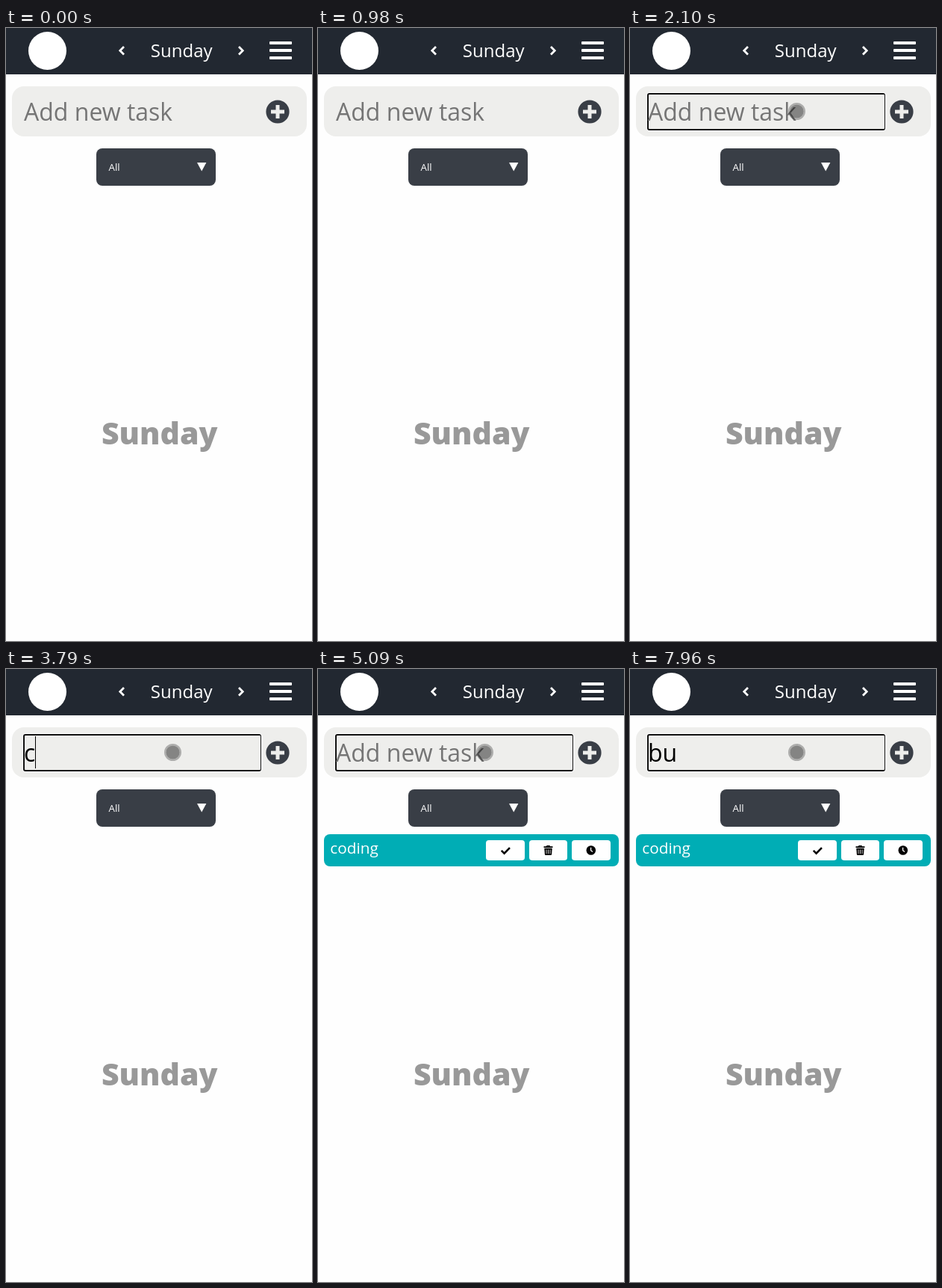
These frames come from a looping animation (410x820 px, 8 s). An HTML page:

```html
<!DOCTYPE html>
<html lang="en">
<head>
<meta charset="utf-8">
<title>Task list</title>
<style>
  html, body { margin: 0; width: 100%; height: 100%; overflow: hidden; background: #fefefe; }
  svg { display: block; width: 410px; height: 820px; }
  text { font-family: "Open Sans", "Noto Sans", sans-serif; white-space: pre; }
</style>
</head>
<body>
<svg viewBox="0 0 410 820">
  <rect width="410" height="820" fill="#fefefe"/>

  <!-- header -->
  <rect width="410" height="62" fill="#222831"/>
  <circle cx="55.5" cy="30.5" r="25.5" fill="#fff"/>
  <g fill="none" stroke="#fff" stroke-width="2.8">
    <path d="M158 25l-5.2 5.2 5.2 5.2M312 25l5.2 5.2-5.2 5.2"/>
  </g>
  <text x="235.2" y="39" font-size="24" text-anchor="middle" fill="#fff">Sunday</text>
  <g fill="#fff">
    <rect x="353" y="18" width="30" height="4" rx="1"/>
    <rect x="353" y="28" width="30" height="4" rx="1"/>
    <rect x="353" y="38" width="30" height="4" rx="1"/>
  </g>

  <!-- task entry -->
  <rect x="8" y="78" width="395" height="67" rx="16" fill="#eeeeec"/>
  <g id="ring">
    <rect x="22" y="86" width="321" height="52" rx="4" fill="#fff"/>
    <rect x="23" y="87" width="319" height="50" rx="3" fill="#101010"/>
    <rect x="25" y="89" width="316" height="46" rx="1" fill="#eeeeec"/>
  </g>
  <text id="entry" x="24" y="124" font-size="32"></text>
  <rect id="caret" y="90" width="1" height="43" fill="#000"/>
  <circle cx="364" cy="112" r="15.6" fill="#393e46"/>
  <path d="M355 112h18M364 103v18" stroke="#eeeeec" stroke-width="5"/>

  <!-- filter -->
  <rect x="121" y="161" width="160" height="50" rx="8" fill="#393e46"/>
  <text x="137.5" y="191" font-size="13.333" fill="#fff">All</text>
  <path d="M256 180h12.4l-6.2 11.6z" fill="#fff"/>

  <text x="205.7" y="557" font-size="41" font-weight="800" text-anchor="middle" fill="#999">Sunday</text>

  <!-- task row -->
  <g id="task">
    <rect x="8" y="221" width="395" height="43" rx="8" fill="#00adb5"/>
    <text x="16.3" y="247" font-size="20.8" fill="#fff">coding</text>
    <g fill="#fff">
      <rect x="225" y="229" width="52" height="27" rx="4"/>
      <rect x="283" y="229" width="51" height="27" rx="4"/>
      <rect x="340" y="229" width="52" height="27" rx="4"/>
    </g>
    <path d="M245.8 242.8l3.8 3.8 7.4-7.4" fill="none" stroke="#000" stroke-width="2.6"/>
    <path d="M302.5 237.2h3.3l.8-1.2h3.8l.8 1.2h3.3v1.7h-12z" fill="#000"/>
    <path d="M303.3 239.8h10.4l-.6 8.2q-.1 1-1.1 1h-7q-1 0-1.1-1z" fill="#000"/>
    <path d="M306 241.5v5.7M308.5 241.5v5.7M311 241.5v5.7" stroke="#fff" stroke-width=".8"/>
    <circle cx="365.8" cy="242.5" r="6.3" fill="#000"/>
    <path d="M365.6 238.7v4l2.4 1.8" fill="none" stroke="#fff" stroke-width="1.3"/>
  </g>

  <!-- touch pointer -->
  <g id="pointer">
    <circle r="10.3" fill="none" stroke="#000" stroke-opacity=".27" stroke-width="2.4"/>
    <circle id="core" r="9.1" fill="#000"/>
  </g>
</svg>
<script>
const LOOP = 8000;
const [ring, entry, caret, task, pointer, core] =
  ["ring", "entry", "caret", "task", "pointer", "core"].map(id => document.getElementById(id));

// [time, entry text]
const keys = [
  [0, ""], [3790, "c"], [3850, "co"], [4290, "cod"], [4450, "codi"],
  [4640, "codin"], [4760, "coding"], [5090, ""], [7300, "b"], [7470, "bu"]
];

// [time, x, y]
const swipe = [
  [690, 372, 760], [723, 260, 370], [790, 243, 318], [830, 238, 297],
  [880, 235, 276], [950, 232, 236], [1000, 229, 192], [1090, 226, 150],
  [1200, 224, 124], [1360, 223.5, 111.5]
];
const STEP = 33.5;

const show = (el, on) => el.setAttribute("visibility", on ? "visible" : "hidden");

function pointerAt(t) {
  const end = swipe[swipe.length - 1];
  if (t >= end[0]) return [end[1], end[2]];
  const held = 690 + Math.floor((t - 690) / STEP) * STEP;
  const i = Math.max(1, swipe.findIndex(p => p[0] > held));
  const [a, b] = [swipe[i - 1], swipe[i]];
  const k = Math.max(0, (held - a[0]) / (b[0] - a[0]));
  return [a[1] + (b[1] - a[1]) * k, a[2] + (b[2] - a[2]) * k];
}

function draw(t) {
  const [since, typed] = keys.filter(k => k[0] <= t).pop();
  entry.textContent = typed || "Add new task";
  entry.setAttribute("fill", typed ? "#000" : "#757575");
  show(caret, typed && t - since < 490);
  if (typed) caret.setAttribute("x", Math.floor(24 + entry.getComputedTextLength()));

  show(ring, t >= 2100);
  show(task, t >= 5090);

  // the pointer drops out briefly as it reaches the filter
  show(pointer, t >= 690 && !(t >= 980 && t < 1000));
  pointer.setAttribute("transform", `translate(${pointerAt(t)})`);
  core.setAttribute("fill-opacity", t >= 1900 && t < 2030 ? 0.6 : 0.445);
}

const start = performance.now();
function tick() {
  draw((performance.now() - start) % LOOP);
  requestAnimationFrame(tick);
}
draw(0);
requestAnimationFrame(tick);
</script>
</body>
</html>
```
